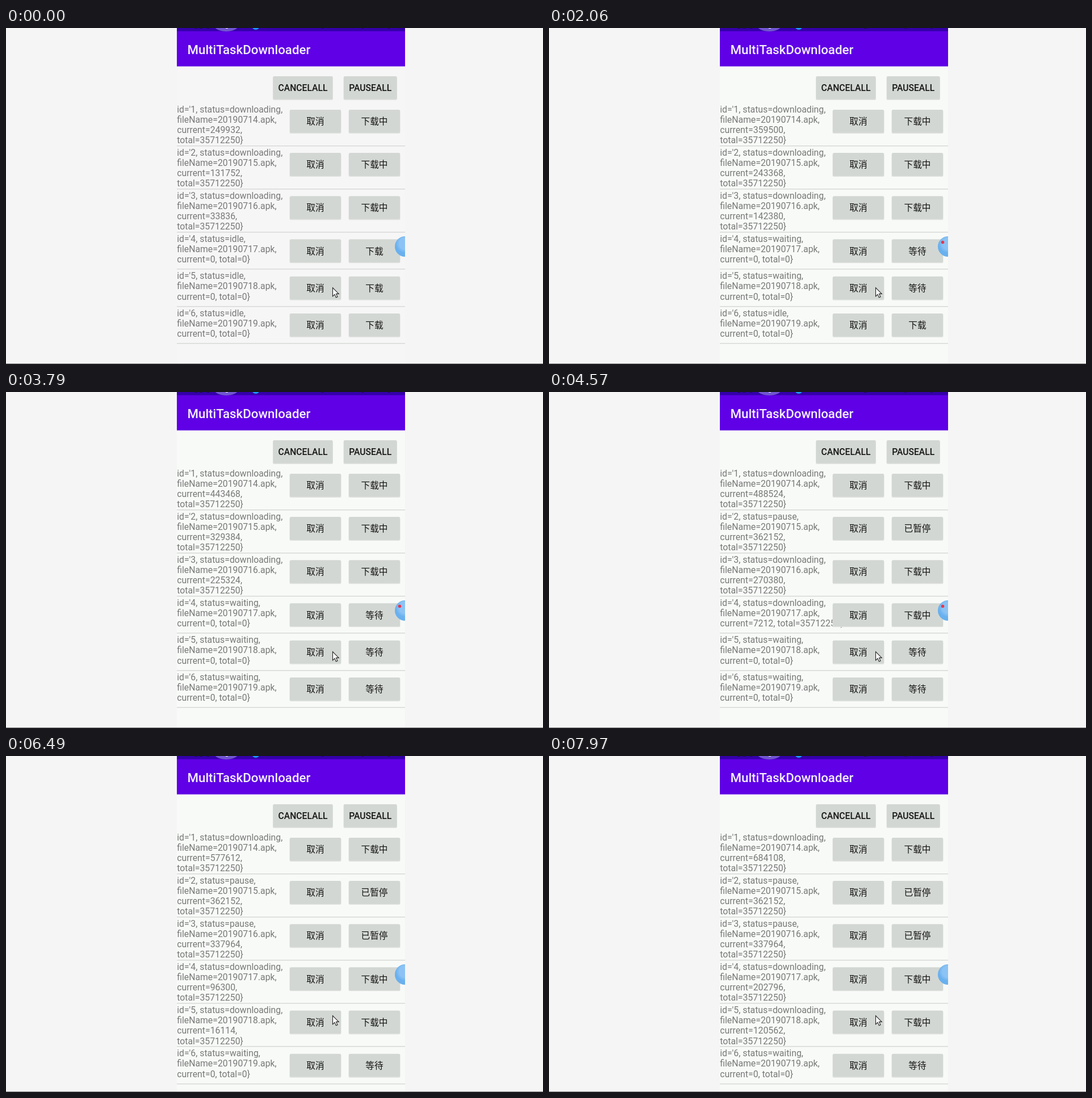
Recreate the animation shown at these times as an HTML page. Size 946 by 592 pixels, loop 8 s.

```html
<!DOCTYPE html>
<html lang="zh-CN">
<head>
<meta charset="utf-8">
<style>
html, body { margin: 0; width: 100%; height: 100%; overflow: hidden; background: #f5f5f5; }
svg { display: block; width: 946px; height: 592px; }
text { font-family: Roboto, "Noto Sans CJK SC", "Noto Sans CJK", sans-serif; font-size: 15.7px; white-space: pre; }
.info { font-size: 15.8px; fill: #777977; }
.label { font-weight: 500; fill: #141514; text-anchor: middle; }
.title { font-weight: 500; font-size: 22.3px; fill: #f4efff; }
</style>
</head>
<body>
<svg viewBox="0 0 946 592">
  <clipPath id="phone"><rect x="301" width="402" height="592"/></clipPath>
  <radialGradient id="ball" gradientUnits="userSpaceOnUse" cx="703" cy="380" r="22">
    <stop offset=".45" stop-color="#8cc3f4"/>
    <stop offset=".75" stop-color="#69b0ee"/>
  </radialGradient>
  <g clip-path="url(#phone)">
    <rect id="page" x="301" y="67" width="402" height="524"/>
    <rect x="301" width="402" height="67.6" fill="#5f00e6"/>
    <rect x="301" width="402" height="5.6" fill="#3400a8"/>
    <ellipse cx="388" cy="-4" rx="21" ry="10" fill="#7056cf"/>
    <path d="M387 0h4" stroke="#e9e2ff" stroke-width="2"/>
    <circle cx="440" cy="-4" r="7" fill="#1b9df5"/>
    <path d="M332 0h5m4 0h5m8 0h4M555 0h5M626 0h4m42 0h4" stroke="#160858" stroke-width="2"/>
    <text class="title" x="319.5" y="45.6">MultiTaskDownloader</text>
    <g id="list"></g>
    <circle cx="703" cy="385" r="18" fill="url(#ball)"/>
    <circle id="dot" cx="693.5" cy="377.5" r="2.8" fill="#e8364c"/>
  </g>
  <path d="M575.5 457.5v15.2l3.5-3.3 2.4 5.4 2.6-1.1-2.4-5.3h4.6z" fill="#fff" stroke="#222" stroke-width="1.1"/>
  <path d="M0 591.5h946" stroke="#858585"/>
</svg>
<script>
const LOOP = 8000, STEP = 137.5, LEAD = 30, BLOCK = 1024, TOTAL = 35712250;
const labels = { idle: '下载', waiting: '等待', downloading: '下载中', pause: '已暂停' };

// Shared download speed: [step, blocks received so far]
const speed = [[0, 0], [9, 69], [21, 144], [33, 233], [41, 282], [47, 320], [58, 424]];

// wait and start are steps, first and stop are bytes
const tasks = [
  { first: 249932 },
  { first: 131752, rate: 1.022, stop: 362152 },
  { first: 33836, rate: .993, stop: 337964 },
  { first: 7212, wait: 5, start: 33 },
  { first: 9970, rate: .981, wait: 13, start: 46 },
  { wait: 18, start: Infinity }
];

const $ = id => document.getElementById(id);

function blocks(step) {
  const i = speed.findIndex(k => k[0] >= step);
  if (i < 1) return 0;
  const [s0, b0] = speed[i - 1], [s1, b1] = speed[i];
  return b0 + (b1 - b0) * (step - s0) / (s1 - s0);
}

function state({ first, rate = 1, wait = 0, start = 0, stop = TOTAL }, step) {
  if (step < start) return { status: step < wait ? 'idle' : 'waiting', current: 0, total: 0 };
  const got = first + BLOCK * Math.round(rate * (blocks(step) - blocks(start)));
  return { status: got < stop ? 'downloading' : 'pause', current: Math.min(got, stop), total: TOTAL };
}

const text = (cls, x, y, s) => `<text class="${cls}" x="${x}" y="${y}">${s}</text>`;
const button = (x, y, w, s) =>
  `<rect x="${x - .5}" y="${y + .6}" width="${w + 1}" height="41.4" rx="2.5" fill="#dfe2df"/>` +
  `<rect x="${x}" y="${y}" width="${w}" height="40.6" rx="2" fill="#d3d7d3"/>` +
  text('label', x + w / 2, y + 26.2, s);

function draw(step) {
  let y = 131.6;
  let out = button(470.5, 85, 105, 'CANCELALL') + button(595, 85, 93.5, 'PAUSEALL');
  tasks.forEach((task, i) => {
    const { status, current, total } = state(task, step);
    const wrap = current >= 10000;
    const info = `id='${i + 1}, status=${status},\nfileName=201907${14 + i}.apk,\n` +
      `current=${current},${wrap ? '\n' : ' '}total=${total}}`;
    info.split('\n').forEach((s, n) => out += text('info', 301.2, y + 17 + n * 18.1, s));
    out += button(500, y + 12.3, 90, '取消') + button(604, y + 12.3, 90, labels[status]);
    y += wrap ? 76.15 : 65.3;
    out += `<rect x="301" y="${Math.round(y) - .9}" width="402" height="1.3" fill="#d3d5d3"/>`;
  });
  $('list').innerHTML = out;
  $('page').setAttribute('fill', step < 1 ? '#f6f6f6' : '#f8faf8');
  $('dot').style.display = step >= 5 && step < 38 ? '' : 'none';
}

let shown = -1;
function frame() {
  const step = Math.floor((performance.now() % LOOP + LEAD) / STEP);
  if (step !== shown) draw(shown = step);
  requestAnimationFrame(frame);
}
frame();
</script>
</body>
</html>
```
